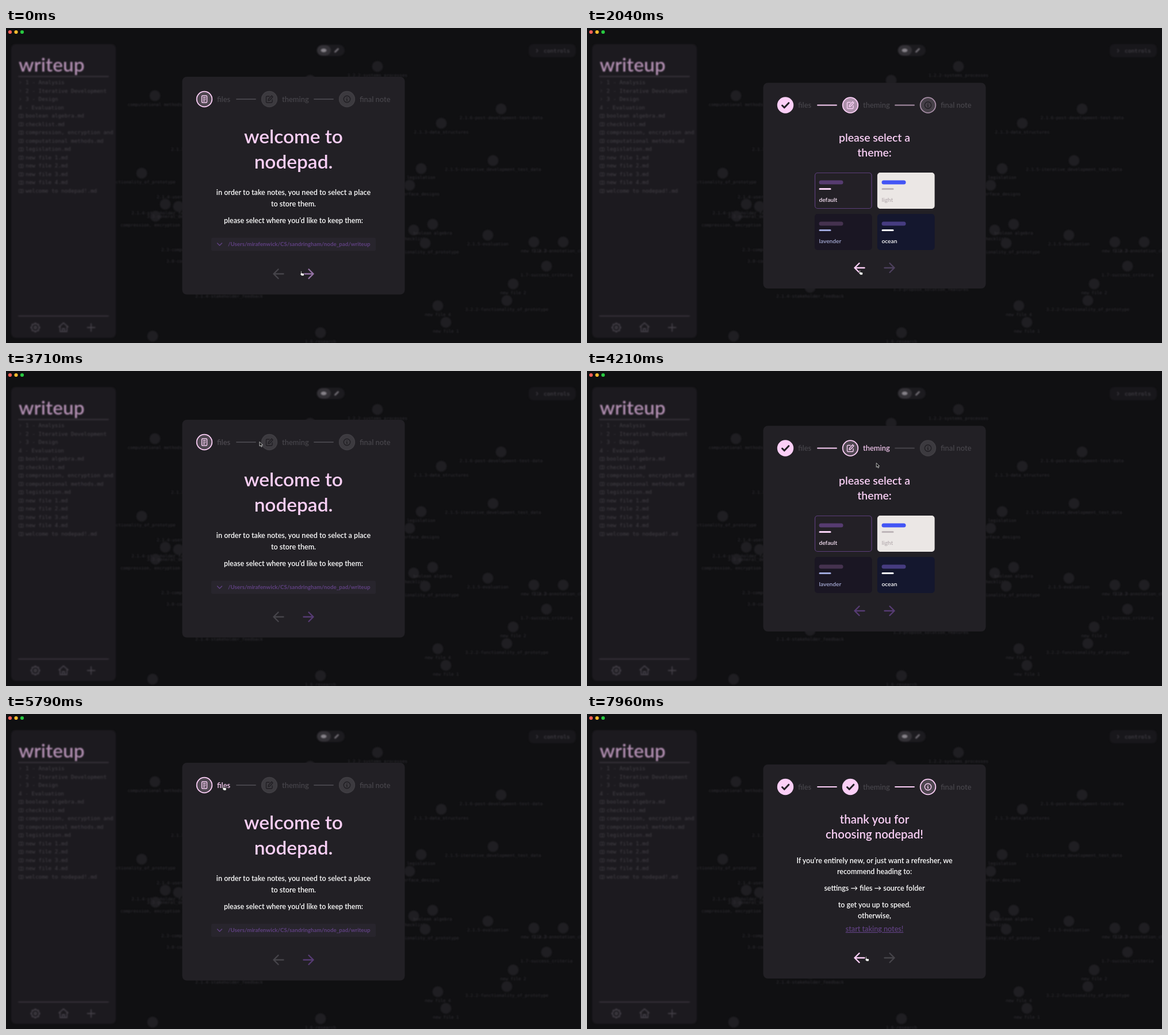
These frames come from a looping animation (1000x549 px, 8000 ms). An HTML page:

```html
<!DOCTYPE html>
<html lang="en">
<head>
<meta charset="utf-8">
<title>nodepad setup</title>
<style>
  html, body { margin: 0; width: 100%; height: 100%; overflow: hidden; background: #101012; }
  svg { display: block; width: 100vw; height: 100vh; font-family: Lato, sans-serif; font-weight: 600; }
  .mono { font-family: "DejaVu Sans Mono", monospace; font-weight: 400; }
  .mid { text-anchor: middle; }
  .line { fill: none; stroke-linecap: round; stroke-linejoin: round; }
  .blur { filter: blur(1px); }
</style>
</head>
<body>
<svg id="stage" viewBox="0 0 1000 549"></svg>
<script>
const LOOP = 8000, FADE = 200;
const PINK = [252, 207, 247], PURPLE = [86, 59, 115], GREY = [70, 68, 74];

// Markup helpers
const text = (s, x, y, size, fill, extra = '') =>
  `<text x="${x}" y="${y}" font-size="${size}" fill="${fill}" ${extra}>${s}</text>`;
const centred = (s, y, size, fill = '#fff', extra = '') => text(s, 500, y, size, fill, 'class="mid" ' + extra);
const rect = (x, y, w, h, r, fill, extra = '') =>
  `<rect x="${x}" y="${y}" width="${w}" height="${h}" rx="${r}" fill="${fill}" ${extra}/>`;
const dot = (x, y, r, fill) => `<circle cx="${x}" cy="${y}" r="${r}" fill="${fill}"/>`;
const line = (d, stroke, width, extra = '') =>
  `<path class="line" d="${d}" stroke="${stroke}" stroke-width="${width}" ${extra}/>`;

// Blurred workspace behind the dialog
const nodes = [
  [646, 67, '1.2.2-systems_processes'], [259, 118, 'computational methods'], [529, 91, ''],
  [757, 166, '2.1.3-data_structures'], [861, 141, '2.1.6-post-development-test-data'],
  [847, 231, '2.1.5-iterative_development_test_data'], [722, 245, 'legislation'],
  [702, 274, '2.1.2-interface_designs'], [236, 253, 'functionality_of_prototype'],
  [300, 311, ''], [277, 307, '2.1.4-stakeholder_feedback'], [260, 328, 'compression, encryption and'],
  [709, 352, 'checklist'], [742, 342, 'boolean algebra'], [729, 375, 'functionality_of_prototype'],
  [838, 361, '2.1.5-evaluation'], [918, 373, 'new file 3'], [969, 373, '2.2.2-annotation_charts'],
  [940, 415, '1.7-success_criteria'], [882, 446, 'new file 2'], [871, 475, '3.2.2-functionality_of_prototype'],
  [751, 484, 'new file 4'], [765, 513, 'new file 1'], [388, 452, '2.1.4-stakeholder_feedback'],
  [598, 440, '1.3-propose_solution_features'], [255, 537, ''], [547, 531, '1.6-research'],
];
const loose = [[287, 214, '2.1.1-user'], [262, 297, '2.1.4-user_tests'], [245, 331, '3.3-general_design'],
  [270, 389, '2.3-computing'], [279, 409, '3.0-conclusion']];
const folders = ['1 - Analysis', '2 - Iterative Development', '3 - Design', '4 - Evaluation'];
const files = ['boolean algebra', 'checklist', 'compression, encryption and', 'computational methods',
  'legislation', 'new file 1', 'new file 2', 'new file 3', 'new file 4', 'welcome to nodepad!'];

function workspace() {
  const ink = '#454248', dim = '#3b383e', icons = '#433f47', rule = '#3f3a42', label = '#323036';
  const graph = nodes.map(([x, y, s]) => dot(x, y, 9.5, '#1f1e22') + text(s, x, y + 18, 7.5, label, 'class="mid"')).join('')
    + loose.map(([x, y, s]) => text(s, x, y, 7.5, label)).join('');
  const rows = [...folders, ...files].map((s, i) => {
    const y = 95 + i * 14.53, folder = i < 4;
    if (i === 3) return text(s, 22, y + 3, 9.4, ink);
    const icon = folder ? line(`M24 ${y - 2}l2 2-2 2`, dim, 1)
      : line(`M23 ${y - 2.5}h7v5.5h-7zM26.5 ${y - 2.5}v5.5`, dim, 1);
    return icon + text(folder || i === 6 ? s : s + '.md', 34, y + 3, 9.4, ink);
  }).join('');
  const gear = [...Array(8)].map((_, i) =>
    `<path d="M51 515v-1.5" stroke="${icons}" stroke-width="3" transform="rotate(${i * 45} 51 522)"/>`).join('');
  return `<g class="blur mono">${graph}</g>
    <g class="blur">
      ${rect(9, 28, 182, 512, 8, '#1c1a1f')}
      ${text('writeup', 22, 76, 33.4, '#b28fb2')}
      ${line('M22 84.5H178', rule, 1.6)}
      <g class="mono">${rows}</g>
      ${line('M22 502H178', rule, 1.6)}
      ${line('M57.5 522a6.5 6.5 0 1 0-13 0a6.5 6.5 0 1 0 13 0M53 522a2 2 0 1 0-4 0a2 2 0 1 0 4 0', icons, 1.8)}${gear}
      ${line('M92 521l8-7 8 7M94 520v9h12v-9M98 529v-5h4v5M148 515.500v13M141.500 522h13', icons, 1.8)}
      ${rect(540, 29, 49, 20, 10, '#1c1b1f')}${rect(541, 30, 24, 18, 9, '#333136')}
      <ellipse cx="552.5" cy="39" rx="5" ry="3.2" fill="#858188"/>
      ${line('M572.500 41.500l5-5', '#706c73', 3)}
      ${rect(909, 28, 82, 23, 8, '#18171b')}
      ${line('M922.500 37l2.500 2.500-2.500 2.500', '#3f3c43', 1.2)}
      ${text('controls', 935, 43, 9.5, '#4d4a51', 'class="mono"')}
    </g>`;
}

function card(x, y, name, fill, bar, accent, ink, edge = fill) {
  return rect(x, y, 98.5, 62, 4.5, fill, `stroke="${edge}" stroke-width="1.2"`)
    + rect(x + 7, y + 13, 42, 7, 3.5, bar) + rect(x + 7, y + 26.5, 21, 3, 1.5, accent)
    + text(name, x + 7, y + 50.5, 10.2, ink);
}

const pink = '#f9cff5';
const pages = [
  { top: 85, bottom: 464.5, body:
    centred('welcome to', 201, 33.4, pink) + centred('nodepad.', 244.5, 33.4, pink)
    + centred('in order to take notes, you need to select a place', 291, 12.6)
    + centred('to store them.', 311, 12.6)
    + centred("please select where you'd like to keep them:", 340, 12.5)
    + rect(357, 365.5, 286, 23, 3, '#28252d') + line('M367.500 375l4 4 4-4', '#5f4080', 1.5)
    + text('/Users/mirafenwick/CS/sandringham/node_pad/writeup', 386, 380, 9.75, '#5f4080', 'font-weight="700"') },
  { top: 95.5, bottom: 454, body:
    centred('please select a', 198, 19.4, pink) + centred('theme:', 224, 19.4, pink)
    + card(396.5, 252.5, 'default', '#232026', '#563b70', '#f9d3f6', '#f9e3f7', '#5c3d7a')
    + card(505.5, 252.5, 'light', '#ebe7e5', '#4355f5', '#bdb5b8', '#b7afb2')
    + card(396.5, 324.5, 'lavender', '#1a1623', '#45324f', '#9fa8dc', '#a7acd6')
    + card(505.5, 324.5, 'ocean', '#14172e', '#463c80', '#fff', '#fff') },
  { top: 88, bottom: 461, body:
    centred('thank you for', 191, 20.4, pink) + centred('choosing nodepad!', 217, 20.4, pink)
    + centred("If you're entirely new, or just want a refresher, we", 260, 12.5)
    + centred('recommend heading to:', 279, 12.5)
    + centred('settings → files → source folder', 308, 12.5)
    + centred('to get you up to speed.', 337, 12.5) + centred('otherwise,', 356, 12.5)
    + centred('start taking notes!', 379, 12.6, '#5f4080', 'text-decoration="underline"') },
];

const steps = [
  { name: 'files', x: 345, end: 391, icon: 'M-4.500-4.500a1.500 1.500 0 0 1 1.500-1.500H3a1.500 1.500 0 0 1 1.500 1.500V4.500A1.500 1.500 0 0 1 3 6H-3A1.500 1.500 0 0 1-4.500 4.500zM-2-3H2M-2 0H2M-2 3H1' },
  { name: 'theming', x: 458, end: 525, icon: 'M0-5H-4.500L-5.500-4V5L-4.500 6H4L5 5V1M-2 2.500l.500-2.500L4-6l2 2L.500 2z' },
  { name: 'final note', x: 593, end: 669, icon: 'M5.700 0a5.700 5.700 0 1 0-11.400 0a5.700 5.700 0 1 0 11.400 0M-.800-.300H0V3M0-2.700v.100' },
];

const stepMarkup = (s, i) => `<g id="step${i}">
  <circle cx="${s.x}" r="13.3" stroke-width="1.8"/>
  <g transform="translate(${s.x})">${line(s.icon, pink, 1.4)}
  ${line('M-5.500.500L-1.800 4.300L5.800-3.800', '#222025', 3)}</g>
  ${text(s.name, s.x + 22, 4.5, 12.9, '#000')}</g>`;

document.getElementById('stage').innerHTML =
  rect(0, 0, 1000, 549, 0, '#101012') + workspace()
  + ['#ff5f57', '#febc2e', '#28c840'].map((c, i) => dot(7 + i * 10.5, 7, 3.1, c)).join('')
  + rect(306.5, 0, 387, 0, 8, '#222025', 'id="panel"')
  + pages.map((p, i) => `<g id="page${i}">${p.body}</g>`).join('')
  + `<g id="steps">${steps.map(stepMarkup).join('')}
      ${line('M401 0H434', pink, 1.8, 'id="link0"')}${line('M536 0H569', pink, 1.8, 'id="link1"')}</g>
    <g id="arrows">${line('M482.500 0H465.500M473.500-8L465.500 0l8 8', pink, 2.4, 'id="back"')}
      ${line('M517.500 0H534.500M526.500-8L534.500 0l-8 8', pink, 2.4, 'id="next"')}</g>
    <g id="cursor" stroke-width=".8" stroke-linejoin="round">
      <path id="pointer" d="M0 0V7.500L1.800 6L3 8.800L4.300 8.200L3.100 5.500H5.500z" fill="#111" stroke="#ddd"/>
      <path id="hand" d="M-.500 0q1-1 1.500.200V3l3.500.700q1 .300 1 1.200L5 8H1L-1.800 4.800q.300-1 1.300-.300z" fill="#fff" stroke="#111"/>
    </g>`;
const el = id => document.getElementById(id);

// Page shown from each time on, and the pointer's route
const turns = [[350, 1], [850, 2], [1950, 1], [3260, 0], [4000, 1], [5400, 0], [6330, 2]];
const route = [
  [-150, 480, 424], [-60, 513, 424], [350, 514, 424], [880, 521, 424], [1150, 524, 425], [1550, 476, 424],
  [2200, 474, 422], [2760, 484, 128], [2880, 487, 129], [2960, 487, 129], [3200, 376, 124], [3450, 378, 124],
  [3710, 441, 123.5], [3900, 495, 128], [4150, 500, 130], [4450, 530, 412], [4650, 530, 412], [4980, 509, 134],
  [5080, 510, 134.5], [5150, 509, 134], [5350, 376, 127], [5900, 378, 125], [6280, 625, 126], [6540, 628, 127],
  [6680, 540, 300], [6850, 480, 424], [7250, 474, 424], [7450, 540, 395], [7600, 590, 400], [7750, 486, 423], [8000, 485, 423],
];

const pageAt = t => turns.reduce((page, [start, to]) => t >= start ? to : page, 0);

function cursorAt(t) {
  const i = Math.max(1, route.findIndex(k => k[0] > t));
  const [t0, x0, y0] = route[i - 1], [t1, x1, y1] = route[i];
  const u = Math.min(1, Math.max(0, (t - t0) / (t1 - t0))), e = u * u * (3 - 2 * u);
  return [x0 + (x1 - x0) * e, y0 + (y1 - y0) * e];
}

// Everything that has a target state at time t
function stateAt(t) {
  const page = pageAt(t), [x, y] = cursorAt(t), { top, bottom } = pages[page];
  const onArrows = Math.abs(y - bottom + 36) < 13, onSteps = Math.abs(y - top - 39) < 14;
  const back = page > 0 && onArrows && x > 462 && x < 488;
  const next = page < 2 && onArrows && x > 512 && x < 540;
  const hover = steps.map(s => onSteps && x > s.x - 14 && x < s.end);
  return { page, x, y, back, next, hover, hand: back || next || hover.includes(true) };
}

// A linear fade is the mean of the targets over the fade's length
function fade(history, target) {
  const sum = [0, 0, 0];
  history.forEach(s => target(s).forEach((v, i) => sum[i] += v / history.length));
  return `rgb(${sum.map(Math.round)})`;
}

function render(t) {
  const history = [...Array(24)].map((_, i) => stateAt(t - FADE * i / 24));
  const now = history[0], { top, bottom } = pages[now.page];
  el('panel').setAttribute('y', top);
  el('panel').setAttribute('height', bottom - top);
  pages.forEach((_, i) => el('page' + i).style.display = i === now.page ? '' : 'none');
  el('steps').setAttribute('transform', `translate(0 ${top + 39})`);
  el('arrows').setAttribute('transform', `translate(0 ${bottom - 36})`);

  steps.forEach((_, i) => {
    const g = el('step' + i), ring = g.querySelector('circle'), [icon, check] = g.querySelectorAll('path');
    ring.style.fill = fade(history, s => s.page > i ? PINK : s.page === i ? [78, 70, 80] : [60, 58, 63]);
    ring.style.stroke = fade(history, s => s.page >= i ? PINK : [64, 62, 67]);
    icon.style.display = now.page > i ? 'none' : '';
    icon.style.stroke = now.page === i ? pink : '#201e23';
    check.style.opacity = now.page > i ? (history.filter(s => s.page > i).length / history.length) ** 2 : 0;
    g.querySelector('text').style.fill = fade(history, s => s.hover[i] ? PINK : GREY);
    if (i < 2) el('link' + i).style.stroke = fade(history, s => s.page > i ? PINK : GREY);
  });
  el('back').style.stroke = fade(history, s => s.page === 0 ? GREY : s.back ? PINK : PURPLE);
  el('next').style.stroke = fade(history, s => s.page === 2 ? GREY : s.next ? PINK : PURPLE);

  el('cursor').setAttribute('transform', `translate(${now.x} ${now.y})`);
  // The pointer shape lags a moment behind a page turn
  const settled = now.hand && !turns.some(([start]) => t >= start && t < start + 60);
  el('hand').style.display = settled ? '' : 'none';
  el('pointer').style.display = settled ? 'none' : '';
}

function tick() {
  render(performance.now() % LOOP);
  requestAnimationFrame(tick);
}
tick();
</script>
</body>
</html>
```
